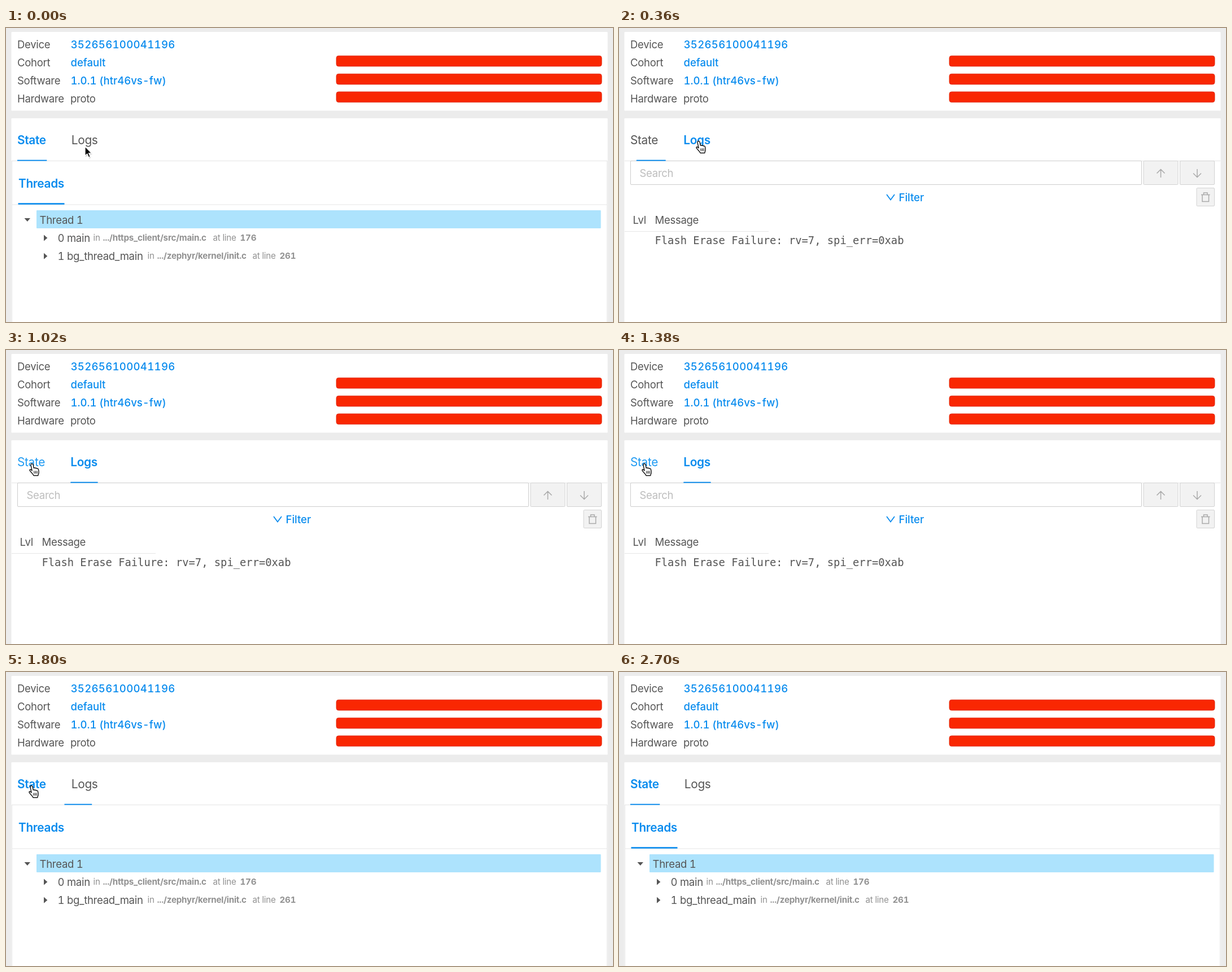
Recreate the animation shown at these times as an HTML page. Size 1075x521 px, loop 2.76 s.

```html
<!DOCTYPE html>
<html lang="en">
<head>
<meta charset="utf-8">
<title>Device state and logs</title>
<style>
  html, body { margin: 0; width: 100%; height: 100%; overflow: hidden; background: #ececec; }
  svg { display: block; width: 1075px; height: 521px; }
  text { font: 18.5px Inter, "Open Sans", sans-serif; font-variant-numeric: tabular-nums; letter-spacing: -.015em; fill: #555; white-space: pre; }
  .link { font-weight: 500; fill: #078bee; letter-spacing: 0; }
  .serial { letter-spacing: .35px; }
  .tab { font-size: 20.8px; }
  .on { font-weight: 600; fill: #078bee; }
  .small { font-size: 15.2px; fill: #929292; }
  .bold { font-weight: 700; }
  .hint { fill: #bdbdbd; }
  .mono { font: 18.8px "DejaVu Sans Mono", monospace; letter-spacing: 0; }
  .ink { fill: #078bee; }
  .line { fill: none; stroke: #e6e6e6; }
  .box { fill: #f2f2f2; stroke: #d2d2d2; }
  .icon { fill: none; stroke: #aaa; stroke-width: 1.5; }
  .caret { fill: #555; }
</style>
</head>
<body>
<svg viewBox="0 0 1075 521">
  <rect width="1075" height="521" fill="#ececec"/>
  <rect x="9.5" y="7" width="1056" height="139.5" rx="1" fill="#fff"/>
  <rect x="9.5" y="160" width="1056" height="370" rx="1" fill="#fff"/>

  <text x="20" y="35.7">Device</text>
  <text x="20" y="67.7">Cohort</text>
  <text x="20" y="99.7">Software</text>
  <text x="20" y="131.7">Hardware</text>
  <text x="114.5" y="35.7" class="link serial">352656100041196</text>
  <text x="114.5" y="67.7" class="link">default</text>
  <text x="114.5" y="99.7" class="link">1.0.1 (htr46vs-fw)</text>
  <text x="114" y="131.7">proto</text>
  <g fill="#f92702" stroke="#dc2404" stroke-width=".8">
    <rect x="585" y="49.3" width="470" height="18.6" rx="4"/>
    <rect x="585" y="81.3" width="470" height="18.6" rx="4"/>
    <rect x="585" y="113" width="470" height="18.6" rx="4"/>
  </g>

  <path class="line" d="M10 235.5H1065"/>
  <text id="stateTab" x="20" y="206" class="tab">State</text>
  <text id="logsTab" y="206" class="tab">Logs</text>

  <g id="stateView">
    <path class="line" d="M10.5 236V521M1064.5 236V521M10 313H1065"/>
    <text x="22" y="282.5" class="tab on">Threads</text>
    <rect id="threadInk" class="ink" x="21.5" y="310.2" height="2.6"/>
    <rect x="54" y="323" width="999.5" height="32" rx="1" fill="#ade3fd"/>
    <path class="caret" d="M32.5 337H43L37.8 343ZM67 366.5V377.5L73.3 372ZM67 398.7V409.7L73.3 404.2Z"/>
    <text x="59.5" y="346.5">Thread 1</text>
    <text x="91.5" y="378.5">0 main</text>
    <text x="154.5" y="377" class="small">in</text>
    <text x="171.5" y="377" class="small bold">.../https_client/src/main.c</text>
    <text x="366.5" y="377" class="small">at line</text>
    <text x="414.5" y="377" class="small bold">176</text>
    <text x="91.5" y="410.7">1 bg_thread_main</text>
    <text x="250.5" y="409.2" class="small">in</text>
    <text x="267.5" y="409.2" class="small bold">.../zephyr/kernel/init.c</text>
    <text x="436.5" y="409.2" class="small">at line</text>
    <text x="484.5" y="409.2" class="small bold">261</text>
  </g>

  <g id="logsView">
    <rect x="20.5" y="235.5" width="905" height="42" rx="1.5" fill="#fff" stroke="#cdcdcd"/>
    <text x="36.5" y="264" class="hint">Search</text>
    <rect class="box" x="929" y="235.5" width="61" height="42" rx="1.5"/>
    <rect class="box" x="993.5" y="235.5" width="61" height="42" rx="1.5"/>
    <rect class="box" x="1023" y="283.5" width="31.5" height="32" rx="1.5"/>
    <path class="icon" d="M959.5 265V250.5M952.5 257.5L959.5 250.5L966.5 257.5M1024 250V264.5M1017 257.5L1024 264.5L1031 257.5"/>
    <path class="icon" d="M1031 295.5H1046.5M1035.5 295V292H1042V295M1033 296V307.5H1044.5V296"/>
    <path d="M474 295L481 304.5L488 295" fill="none" stroke="#078bee" stroke-width="1.8"/>
    <text x="495.5" y="307" class="link">Filter</text>
    <text x="24.5" y="347.2">Lvl</text>
    <text x="63.5" y="347.2">Message</text>
    <path class="line" d="M10 360.5H265"/>
    <text x="63.5" y="382.7" class="mono">Flash Erase Failure: rv=7, spi_err=0xab</text>
  </g>

  <rect id="tabInk" class="ink" y="233.7" height="1.9"/>

  <g id="arrow">
    <path d="M0 0V16.5L3.8 13L6.5 19.3L9.2 18L6.6 12H11.9Z" transform="translate(1 2)" opacity=".2"/>
    <path d="M0 0V16.5L3.8 13L6.5 19.3L9.2 18L6.6 12H11.9Z" stroke="#fff" stroke-width="1.3"/>
  </g>
  <g id="hand" stroke="#111" stroke-width="1.4" stroke-linejoin="round">
    <path fill="#fff" transform="translate(-6 -1)" d="M6 1.5c1.3 0 2 .9 2.2 2l.9 5.6c.6-.6 2.2-.6 2.9.4.9-.6 2.2-.3 2.7.7 1-.5 2.4 0 2.7 1.3.5 2 1 4.5.6 6.5-.3 1.4-1 2.2-1.2 4.5H9c-.8-2.2-3-4.3-4.8-6.3-1.2-1.3-2.6-2.4-2.2-3.6.5-1.3 2-1 3.2.3l.9.9L4 4C3.8 2.6 4.7 1.5 6 1.5z"/>
    <path fill="none" stroke-width="1.1" d="M3.7 13.5L4.2 18M6.3 13.3L6.7 18M8.9 13.2L9.2 18"/>
  </g>
</svg>
<script>
const LOOP = 2760, STEP = 60;
const OPEN_LOGS = 360, OPEN_STATE = 1800;
const GRAY = [85, 85, 85], HOVER = [30, 154, 242], PRESSED = [22, 131, 214];

// time, x, y of the pointer's hot spot
const path = [
  [0, 140, 210], [60, 140, 209], [120, 141, 204], [180, 141, 201], [240, 141, 200],
  [420, 141, 200], [480, 138, 200], [540, 124, 201], [600, 104, 202], [660, 84, 202],
  [720, 66, 202], [780, 55, 201], [840, 49, 201], [1020, 46, 201], [1320, 45, 201],
  [2220, 45, 201], [2280, 45, 214], [2340, 46, 255], [2400, 48, 325],
  [2460, 50, 415], [2520, 52, 522], [2760, 52, 560]
];
const handSpans = [[120, 540], [720, 2220]];

// time, red, green, blue of a tab label that is not selected
const logsColor = [[60, ...GRAY], [180, ...HOVER], [240, ...HOVER], [300, ...PRESSED]];
const stateColor = [[660, ...GRAY], [840, ...HOVER], [1620, ...HOVER], [1740, ...PRESSED]];

const el = id => document.getElementById(id);
const show = (id, visible) => el(id).style.display = visible ? "" : "none";
const clamp = v => Math.max(0, Math.min(1, v));

function sample(keys, t) {
  const i = keys.findIndex(k => k[0] > t);
  if (i === 0) return keys[0].slice(1);
  if (i < 0) return keys[keys.length - 1].slice(1);
  const a = keys[i - 1], b = keys[i], p = (t - a[0]) / (b[0] - a[0]);
  return a.slice(1).map((v, n) => v + (b[n + 1] - v) * p);
}

// cubic-bezier(.645, .045, .355, 1), solved by bisection
function ease(x) {
  x = clamp(x);
  const curve = (u, a, b) => 3 * u * (1 - u) ** 2 * a + 3 * u * u * (1 - u) * b + u ** 3;
  let lo = 0, hi = 1;
  for (let i = 0; i < 20; i++) {
    const mid = (lo + hi) / 2;
    if (curve(mid, .645, .355) < x) lo = mid; else hi = mid;
  }
  return curve(lo, .045, 1);
}

function setTab(id, selected, color) {
  el(id).classList.toggle("on", selected);
  el(id).style.fill = selected ? "" : `rgb(${color.map(Math.round)})`;
}

function draw(t) {
  const logs = t >= OPEN_LOGS && t < OPEN_STATE;
  show("logsView", logs);
  show("stateView", !logs);
  setTab("stateTab", !logs, sample(stateColor, t));
  setTab("logsTab", logs, t < OPEN_LOGS ? sample(logsColor, t) : GRAY);
  el("logsTab").setAttribute("x", logs ? 114.3 : 115.8);

  // the underline is already on its way when the view changes
  const slide = start => ease((t - start + 85) / 300);
  const toLogs = t < OPEN_LOGS ? 0 : logs ? slide(OPEN_LOGS) : 1 - slide(OPEN_STATE);
  el("tabInk").setAttribute("x", 20 + 94.3 * toLogs);
  el("tabInk").setAttribute("width", 52.3 - 4 * toLogs);
  const grown = t < OPEN_LOGS ? 1 : ease((t - OPEN_STATE) / 200);
  el("threadInk").setAttribute("width", 82 * grown);

  const [x, y] = sample(path, t);
  const hand = handSpans.some(([from, to]) => t >= from && t <= to);
  show("hand", hand);
  show("arrow", !hand && y < 521);
  el(hand ? "hand" : "arrow").setAttribute("transform", `translate(${x} ${y})`);
}

const began = performance.now();
function tick() {
  const t = (performance.now() - began) % LOOP;
  draw(Math.floor(t / STEP) * STEP);
  requestAnimationFrame(tick);
}
tick();
</script>
</body>
</html>
```
